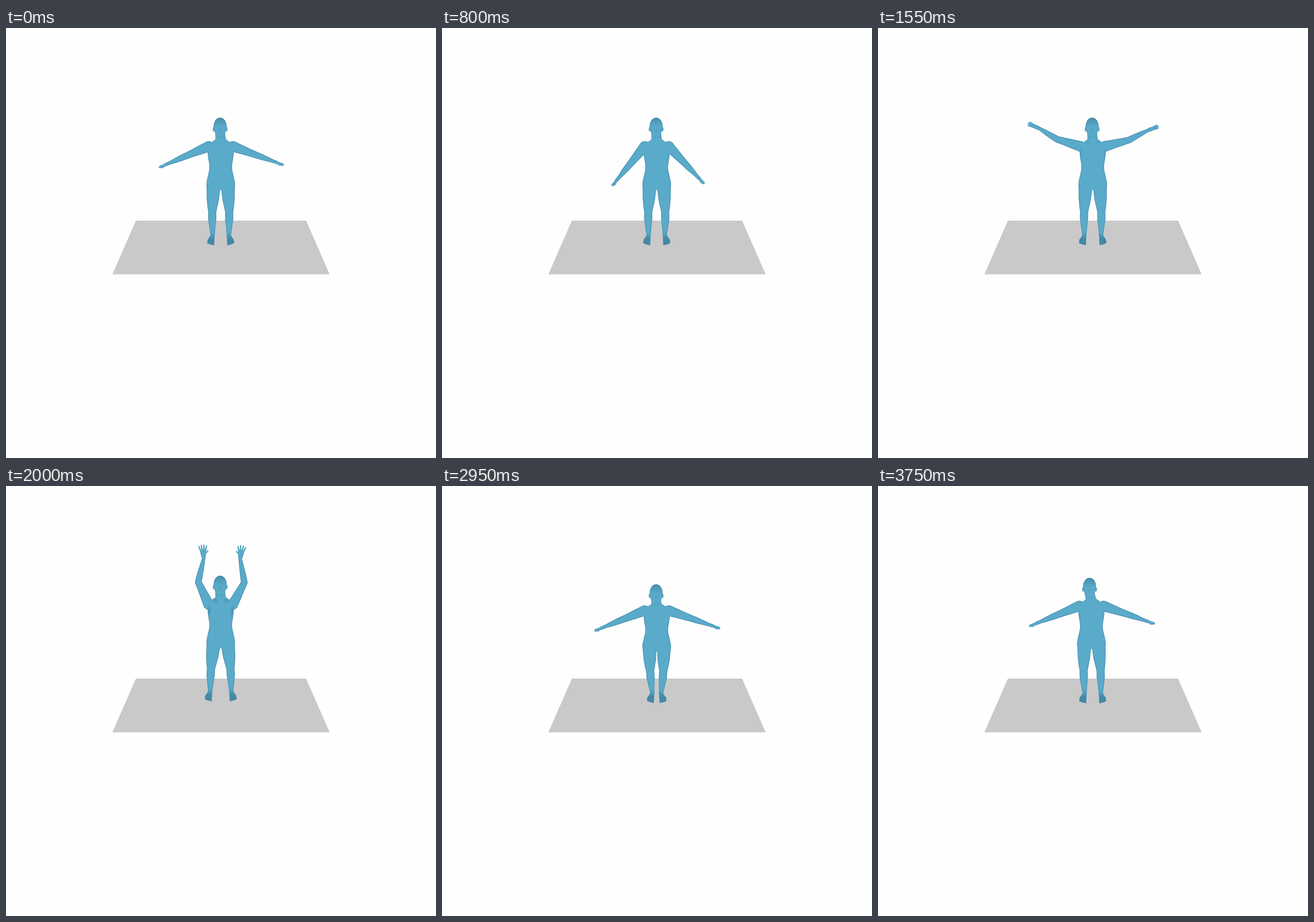
An HTML page with a canvas that plays this animation: 748 px wide and 748 px high, repeating every 3.8 s.

```html
<!DOCTYPE html>
<html lang="en">
<head>
<meta charset="utf-8">
<title>Jumping jack</title>
<style>
html, body { margin: 0; width: 100%; height: 100%; overflow: hidden; background: #fefefe; }
canvas { display: block; width: 748px; height: 748px; }
</style>
</head>
<body>
<canvas id="stage" width="748" height="748"></canvas>
<script>
const ctx = document.getElementById('stage').getContext('2d');
const LOOP = 3800, STEP = 50;
const SKIN = '#5aaac9', RIM = '#4890b0', DARK = '#4388a8';

// time and angle of the upper arm, in degrees away from straight down
const LIFT = [[0, 67], [650, 40], [1100, 52], [1650, 119], [2050, 157],
  [2450, 137], [2950, 68], [3300, 54], [3750, 68]];

const clamp = v => Math.max(0, Math.min(1, v));
const mix = (a, b, u) => a + (b - a) * u;
const bump = (t, centre, width) => Math.exp(-(((t - centre) / width) ** 2));
const along = (a, b, parts) => parts.map(([u, r]) => [mix(a[0], b[0], u), mix(a[1], b[1], u), r]);

// smooth curve through the lift keys
function liftAt(t) {
  const last = LIFT.length - 1;
  let k = 0;
  while (k < last - 1 && t >= LIFT[k + 1][0]) k++;
  const a = LIFT[k], b = LIFT[k + 1];
  const p = LIFT[Math.max(0, k - 1)], n = LIFT[Math.min(last, k + 2)];
  const d = b[0] - a[0], u = clamp((t - a[0]) / d), v = 1 - u;
  const m0 = (b[1] - p[1]) / (b[0] - p[0]) * d;
  const m1 = (n[1] - a[1]) / (n[0] - a[0]) * d;
  return a[1] * v * v * (1 + 2 * u) + b[1] * u * u * (3 - 2 * u) + m0 * u * v * v - m1 * u * u * v;
}

// hop, landing squat and rebound
function poseAt(t) {
  const top = 156 - 6 * bump(t, 2450, 180) + 15 * bump(t, 2950, 170)
    - 3 * bump(t, 3500, 150) + 4 * bump(t, 3750, 120);
  const headX = 372.5 - 4.5 * bump(t, 3750, 350);
  return {
    top, headX,
    cx: (headX + 374.5) / 2,
    shoulderY: 206 + (top - 156) * .72,
    crotch: 282 + (top - 156) * .4,
    spread: 17 + 8 * bump(t, 2400, 500) - 9 * bump(t, 2970, 200),
    sole: 378 - 6 * bump(t, 2300, 400),
    lift: liftAt(t)
  };
}

// chain of tapered segments, nodes are [x, y, radius]
function limb(nodes, inset, fill) {
  ctx.fillStyle = fill;
  ctx.beginPath();
  nodes.forEach(([x, y, radius], i) => {
    const r = Math.max(.4, radius - inset);
    ctx.moveTo(x + r, y);
    ctx.arc(x, y, r, 0, Math.PI * 2);
    if (!i) return;
    const [px, py, pr] = nodes[i - 1], q = Math.max(.4, pr - inset);
    const dx = x - px, dy = y - py, len = Math.hypot(dx, dy) || 1;
    const nx = dy / len, ny = -dx / len;
    ctx.moveTo(px + nx * q, py + ny * q);
    ctx.lineTo(x + nx * r, y + ny * r);
    ctx.lineTo(x - nx * r, y - ny * r);
    ctx.lineTo(px - nx * q, py - ny * q);
    ctx.closePath();
  });
  ctx.fill();
}

function ellipse(x, y, rx, ry, fill) {
  ctx.fillStyle = fill;
  ctx.beginPath();
  ctx.ellipse(x, y, rx, ry, 0, 0, Math.PI * 2);
  ctx.fill();
}

// fingers spread as the arm goes up
function hand(wrist, tip, side, open, inset, fill) {
  const len = Math.hypot(tip[0] - wrist[0], tip[1] - wrist[1]);
  const dir = Math.atan2(tip[1] - wrist[1], tip[0] - wrist[0]);
  const palm = along(wrist, tip, [[0, 2.8], [.25, mix(3, 4.4, open)], [.45, mix(2.4, 4.9, open)]]);
  limb(palm, inset, fill);
  const finger = ([x, y], a, l, r) =>
    limb([[x, y, r], [x + Math.cos(a) * l, y + Math.sin(a) * l, r * .7]], inset * .3, fill);
  for (let o = -1.5; o < 2; o++) {
    const w = o * mix(.7, 2.3, open);
    const root = [palm[2][0] - Math.sin(dir) * w, palm[2][1] + Math.cos(dir) * w];
    finger(root, dir + o * mix(.04, .2, open), len * .55 - Math.abs(o) * 1.4 - .4, mix(1.1, 1.4, open));
  }
  finger(palm[1], dir - side * mix(-.3, .95, open), 10, mix(1.1, 1.5, open));
}

function arm(pose, side, inset, fill) {
  const lift = pose.lift + (side > 0 ? 4 * Math.sin(pose.lift * Math.PI / 90) : 0);
  const open = clamp((lift - 90) / 45);
  const reach = ([x, y], deg, len) => {
    const a = deg * Math.PI / 180;
    return [x + side * Math.sin(a) * len, y + Math.cos(a) * len];
  };
  const shoulder = [pose.cx + side * 21, pose.shoulderY];
  const elbow = reach(shoulder, lift, 43);
  const wrist = reach(elbow, lift + 38 * open, 22 + .13 * lift);
  const tip = reach(wrist, lift + 20 * open, 18 + .04 * lift);
  limb([
    ...along(shoulder, elbow, [[0, 9.2], [.35, 7.9], [.7, 6.6], [1, 5.7]]),
    ...along(elbow, wrist, [[.25, 5.4], [.65, 4.2], [1, 2.9]])
  ], inset, fill);
  hand(wrist, tip, side, open, inset, fill);
}

function leg(pose, side, inset, fill) {
  const ankle = [373.5 + side * (pose.spread - 3), pose.sole - 17];
  const nodes = along([pose.cx + side * 12.5, pose.crotch - 6], ankle,
    [[0, 12], [.25, 10.7], [.4, 8.8], [.52, 7], [.66, 7.1], [.85, 5], [1, 3.6]]);
  // knees bow outward a little
  const bowed = nodes.map(([x, y, r], i) => [x + side * 1.5 * Math.sin(i / 6 * Math.PI), y, r]);
  limb(bowed, inset, fill);
}

function torso({ cx, shoulderY, crotch }, inset, fill) {
  // [height from shoulder to crotch, half width]
  const profile = [[-.18, 8], [-.11, 14], [-.04, 23.5], [.12, 23], [.3, 21.5],
    [.48, 18.8], [.7, 22.8], [.88, 25.6], [1, 23], [1, 10]];
  const half = s => profile.map(([u, w]) => [cx + s * (w - inset), mix(shoulderY, crotch, u)]);
  const loop = [...half(1), ...half(-1).reverse()];
  ctx.fillStyle = fill;
  ctx.beginPath();
  loop.forEach(([x, y], i) => {
    const [nx, ny] = loop[(i + 1) % loop.length];
    if (!i) ctx.moveTo(cx, y);
    ctx.quadraticCurveTo(x, y, (x + nx) / 2, (y + ny) / 2);
  });
  ctx.fill();
}

function head({ headX: x, top, cx }, inset, fill) {
  for (const s of [-1, 1]) ellipse(x + s * 11, top + 20, 1.8 - inset * .5, 3.8 - inset * .5, fill);
  ellipse(x, top + 14.5, 11.2 - inset, 14.5 - inset, fill);
  limb([[x, top + 16, 10.8], [x, top + 22, 9.9], [x, top + 27, 8.4], [cx, top + 40, 9]], inset, fill);
}

function foot(pose, side) {
  const { sole } = pose, x = 373.5 + side * pose.spread;
  const shade = ctx.createLinearGradient(0, sole - 23, 0, sole - 11);
  shade.addColorStop(0, SKIN);
  shade.addColorStop(1, DARK);
  limb([[x - side * 3, sole - 18, 3.6], [x - side * 1.5, sole - 12, 4.8], [x, sole - 7.5, 6.2]], 0, shade);
  for (let i = 0; i < 4; i++) {
    ellipse(x - side * (4 - i * 2.8), sole - 2.6 - i * .9, 2, 2.5, DARK);
  }
}

function shading({ headX, top, cx, shoulderY, lift }) {
  const cap = ctx.createLinearGradient(0, top, 0, top + 16);
  cap.addColorStop(0, 'rgba(55,118,148,.55)');
  cap.addColorStop(1, 'rgba(55,118,148,0)');
  ellipse(headX, top + 14.5, 11, 14.3, cap);
  ellipse(headX, top + 22.5, 2.4, 3, 'rgba(60,130,160,.2)');
  ellipse(headX + .5, top + 34, 6.5, 1.6, 'rgba(60,130,160,.2)');
  const raised = clamp((lift - 90) / 45);
  for (const s of [-1, 1]) {
    ellipse(cx + s * 10, shoulderY - 7, 5, 3.5, `rgba(60,130,160,${.3 * raised})`);
    ellipse(cx + s * 20, shoulderY + 11, 2.5, 9, `rgba(60,130,160,${.35 * raised})`);
  }
}

function ground() {
  ctx.fillStyle = '#c9c9c9';
  ctx.beginPath();
  ctx.moveTo(226, 335);
  ctx.lineTo(522, 335);
  ctx.lineTo(563, 428.5);
  ctx.lineTo(185, 428.5);
  ctx.fill();
}

function draw(t) {
  const pose = poseAt(t);
  ctx.fillStyle = '#fefefe';
  ctx.fillRect(0, 0, 748, 748);
  ground();
  // dark silhouette first, then a slightly thinner light one
  for (const [inset, fill] of [[0, RIM], [1.1, SKIN]]) {
    for (const side of [-1, 1]) {
      leg(pose, side, inset, fill);
      arm(pose, side, inset, fill);
    }
    torso(pose, inset, fill);
    head(pose, inset, fill);
  }
  shading(pose);
  foot(pose, -1);
  foot(pose, 1);
}

function tick() {
  const t = performance.now() % LOOP;
  draw(Math.floor(t / STEP) * STEP);
  requestAnimationFrame(tick);
}
tick();
</script>
</body>
</html>
```
